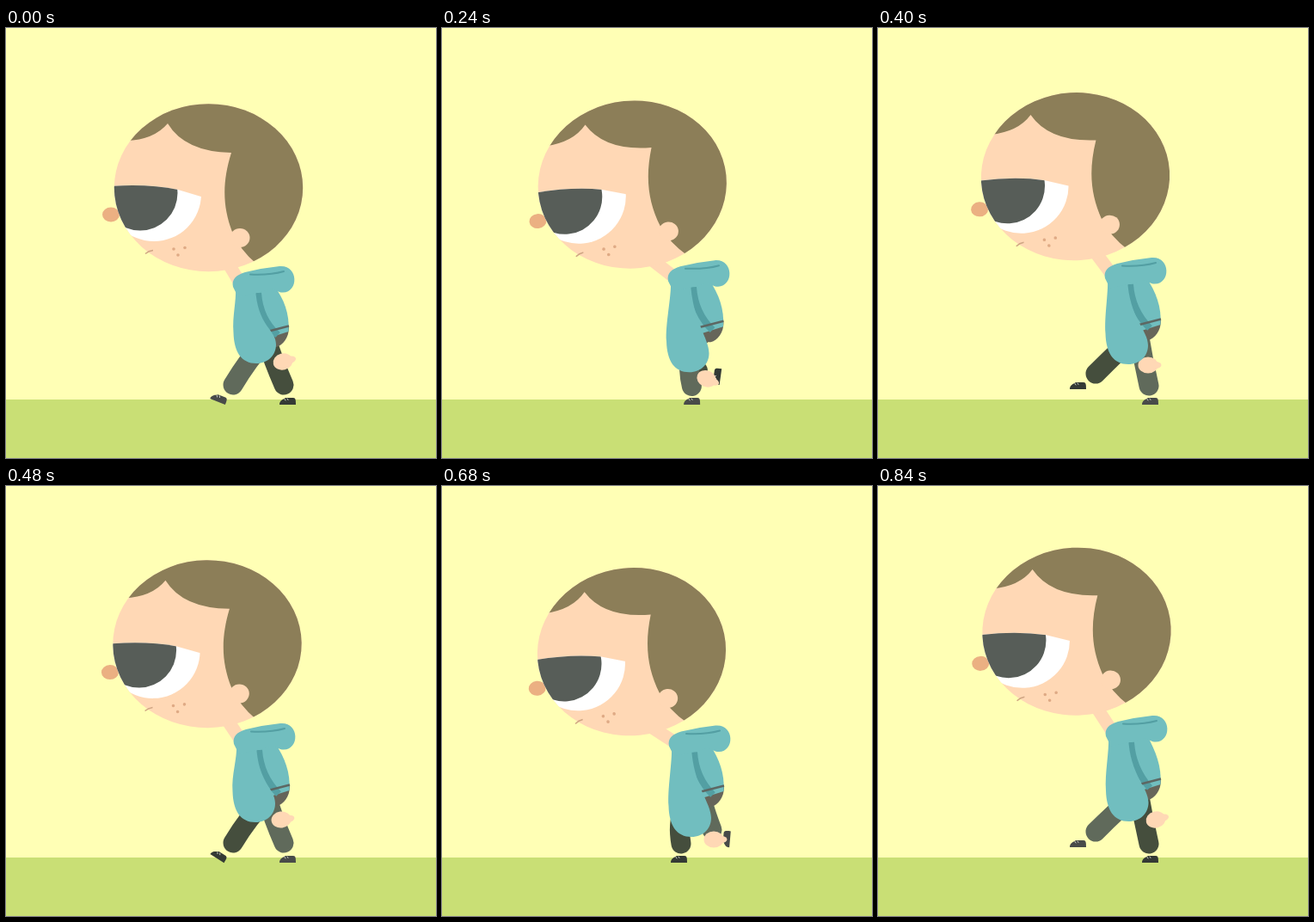
Animation of 500 by 500 pixels, one loop 0.96 s. Source, as an HTML page with a canvas:

```html
<!DOCTYPE html>
<html>
<head>
<meta charset="utf-8">
<style>
html, body { margin: 0; height: 100%; overflow: hidden; background: #ffffb5; }
canvas { display: block; }
</style>
</head>
<body>
<canvas id="stage" width="500" height="500"></canvas>
<script>
const ctx = document.getElementById('stage').getContext('2d');
const LOOP = 960;
const STEPS = [0, 40, 80, 120, 200, 240, 280, 320, 360, 440, 480, 520, 600, 680, 760, 800, 840];
const SKIN = '#ffd8b5', HAIR = '#8c7e58', COAT = '#71bebf', SHADE = '#539fa3', HIPS = '#66655a';

// time: head x, y, angle | shoulders x, y | sleeve x, y | back x, y | hand x, y, angle
const BODY = {
  0:   [0, 0, 0, 0, 0, 0, 0, 0, 0, 322, 388, -15],
  120: [-14, 15, -5.2, -3, 10, -4, 18, -2, 5, 314, 411, -10],
  200: [-15, 4, -5.8, -1, 0, -3, 16, -1, 0, 312, 410, 5],
  280: [-12.5, -9.5, -5.6, -1, -11, -4, 4, -2, -10, 304, 404, 35],
  360: [-6, -13, -3.5, 0, -10, 0, 1, 0, -8, 314, 392, 0],
  480: [-1.5, -2, -.8, 1, -1, -1, 1, 1, 1, 320, 388, -8],
  600: [-10.5, 19, -5.5, -1, 12, -1, 20, -1, 7, 324, 405, -15],
  680: [-15, 7, -5.8, 0, 1.5, -1, 18, -1, 2, 316, 411, 0],
  760: [-11, -11, -5.5, 0, -10, -2, 5, -1, -9, 309, 403, 30],
  840: [-4.5, -16.5, -3, 1, -10, .5, 0, 0, -6, 323, 388, -15]
};

// phase: knee x, y | ankle x, y | shoe x, y, angle
const NEAR_LEG = {
  0:   [282, 385, 264, 415, 248, 431, 22],
  120: [262, 365, 267, 416, 264, 434, 0],
  200: [270, 370, 278, 416, 276, 434, 0],
  280: [294, 385, 303, 417, 306, 434, 0],
  360: [308, 385, 315, 416, 317, 434, 0],
  480: [310, 385, 323, 415, 328, 434, 0],
  600: [308, 408, 335, 409, 346, 429, -50],
  680: [308, 385, 314, 400, 331, 410, -85],
  760: [242, 378, 278, 397, 303, 400, -75],
  840: [280, 375, 253, 402, 233, 416, 0]
};
const FAR_LEG = {
  ...NEAR_LEG,
  0:   [282, 385, 264, 415, 248, 430, 32],
  600: [308, 385, 326, 398, 342, 412, -82]
};

// Periodic cubic interpolation without overshoot.
function sample(keys, time) {
  const times = Object.keys(keys).map(Number), n = times.length;
  const t = time % LOOP;
  const i = times.findLastIndex(k => k <= t);
  const key = j => keys[times[(j + n) % n]];
  const when = j => times[(j + n) % n] + Math.floor(j / n) * LOOP;
  const span = when(i + 1) - when(i), u = (t - when(i)) / span;
  return key(i).map((a, c) => {
    const b = key(i + 1)[c];
    const slope = j => (key(j + 1)[c] - key(j)[c]) / (when(j + 1) - when(j));
    const tangent = (p, q) => p * q > 0 ? 2 * p * q / (p + q) : 0;
    const m0 = tangent(slope(i - 1), slope(i)) * span;
    const m1 = tangent(slope(i), slope(i + 1)) * span;
    const v = 1 - u;
    return a * v * v * (1 + 2 * u) + b * u * u * (3 - 2 * u) + m0 * u * v * v - m1 * u * u * v;
  });
}

function fill(d, color) {
  ctx.fillStyle = color;
  ctx.fill(new Path2D(d));
}

function line(d, color, width, cap = 'round') {
  ctx.strokeStyle = color;
  ctx.lineWidth = width;
  ctx.lineCap = cap;
  ctx.stroke(new Path2D(d));
}

function oval(x, y, rx, ry, color) {
  ctx.fillStyle = color;
  ctx.beginPath();
  ctx.ellipse(x, y, rx, ry, 0, 0, 7);
  ctx.fill();
}

function placed(x, y, degrees, draw) {
  ctx.save();
  ctx.translate(x, y);
  ctx.rotate(degrees * Math.PI / 180);
  draw();
  ctx.restore();
}

// Gives a function that writes a path point moved by an offset.
const mover = (dx, dy) => (x, y) => ` ${x + dx} ${y + dy} `;

function drawLeg(pose, back, color, shoeColor) {
  const [kx, ky, ax, ay, sx, sy, angle] = pose;
  placed(sx, sy, angle, () => {
    fill('M-10 4C-10-1-6-2-3-4L6-4C9-4 9-1 9 4Z', shoeColor);
    line('M-4-2.5L-3-1M-1-3L0-1.5', '#c9cdc5', 1);
  });
  line(`M${back(303, 362)}Q${kx} ${ky} ${ax} ${ay}`, color, 23);
}

function drawHead() {
  ctx.translate(-235, -186);
  oval(122, 217, 10, 8.5, '#ebb082');
  ctx.save();
  ctx.beginPath();
  ctx.ellipse(235.5, 185.7, 109.7, 97.5, 0, 0, 7);
  ctx.fillStyle = SKIN;
  ctx.fill();
  ctx.clip();
  fill('M140 131Q172 130 188 111Q208 144 262 145C251 180 252 208 263 237Q272 258 291 274L360 270V70H140Z', HAIR);
  ctx.clip(new Path2D('M110 185Q160 180 200 188L230 197V260H110Z'));
  oval(172, 193, 55, 55, '#fff');
  oval(156, 192, 43.5, 43.5, '#575d58');
  ctx.restore();
  oval(272, 244, 11.5, 11, SKIN);
  line('M162 262.5Q166 259 171 258.5', '#cfa583', 1.5, 'butt');
  for (const [x, y] of [[195, 257], [208, 255.5], [200, 264]]) oval(x, y, 1.8, 1.8, '#dfaa85');
}

function drawCoat(top, hem, back) {
  fill(`M${back(298, 345)}L${back(329, 348)}C${back(329, 360)}${back(322, 369)}${back(314, 371)}L${back(298, 371)}Z`, HIPS);
  fill(`M${top(272, 298)}L${top(312, 300)}C${back(323, 315)}${back(330, 332)}${back(328.5, 353)}L${back(300, 362)}Z`, COAT);
  line(`M${top(293, 308)}Q${top(295, 338)}${back(316, 357)}`, SHADE, 8, 'butt');
  line(`M${back(300, 354)}L${back(329, 346.5)}`, '#5d6763', 2.6, 'butt');
  fill(`M${top(267, 302)}C${top(268, 318)}${hem(263, 335)}${hem(264.5, 354)}` +
    `C${hem(265, 377)}${hem(274, 390)}${hem(291, 390)}` +
    `C${hem(305, 390)}${hem(314, 380)}${hem(314, 368)}` +
    `C${hem(314, 350)}${top(292, 347)}${top(290, 302)}Z`, COAT);
  fill(`M${top(264, 301)}C${top(262, 292)}${top(268, 287)}${top(278, 284)}` +
    `Q${top(298, 279)}${top(318, 277)}C${top(340, 275)}${top(341, 307)}${top(322, 307.5)}` +
    `C${top(314, 307.5)}${top(312, 301)}${top(304, 305)}L${top(270, 313)}Z`, COAT);
  line(`M${top(284, 286.5)}Q${top(307, 287.5)}${top(323, 283)}`, SHADE, 2);
}

function draw(time) {
  const [hx, hy, turn, cx, cy, dx, dy, bx, by, px, py, wrist] = sample(BODY, time);
  const top = mover(cx, cy), hem = mover(dx, dy), back = mover(bx, by);

  ctx.fillStyle = '#ffffb5';
  ctx.fillRect(0, 0, 500, 500);
  ctx.fillStyle = '#c9df75';
  ctx.fillRect(0, 432, 500, 68);

  drawLeg(sample(FAR_LEG, time + LOOP / 2), back, '#454e3d', '#343a35');
  drawLeg(sample(NEAR_LEG, time), back, '#606a5b', '#484b49');
  placed(px, py, wrist, () => {
    oval(0, 0, 11.5, 9.5, SKIN);
    oval(9, 0, 6.5, 4, SKIN);
  });
  line(`M${258 + hx} ${273 + hy}L${top(273, 298)}`, SKIN, 15);
  placed(235 + hx, 186 + hy, turn, drawHead);
  drawCoat(top, hem, back);
}

function tick() {
  const t = performance.now() % LOOP;
  draw(STEPS.findLast(s => s <= t));
  requestAnimationFrame(tick);
}
tick();
</script>
</body>
</html>
```
